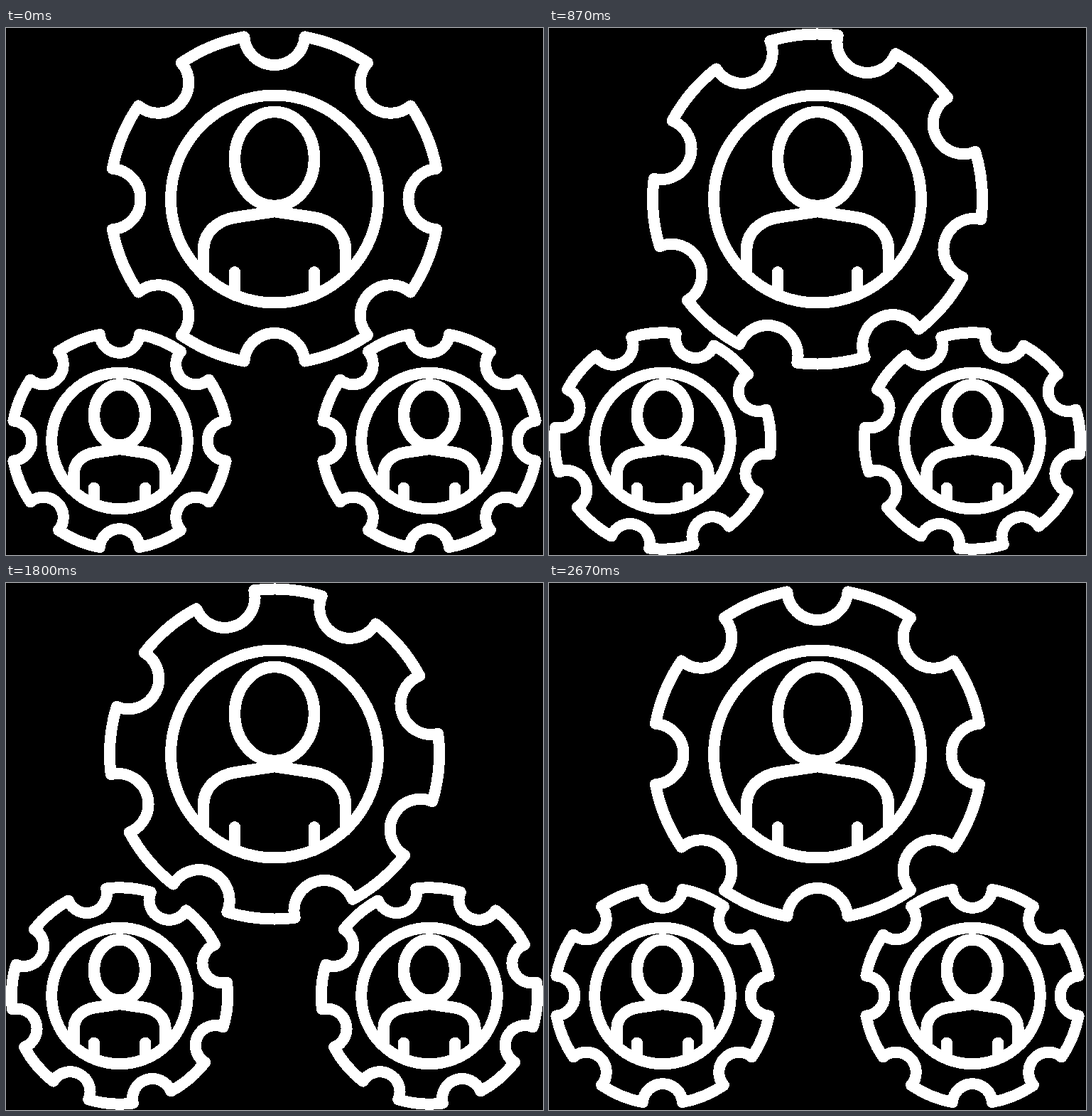
An HTML page that plays this animation: 756x741 px, repeating every 2.7 s.

```html
<!DOCTYPE html>
<html>
<head>
<meta charset="utf-8">
<title>Team gears</title>
<style>
  html, body { margin: 0; height: 100%; overflow: hidden; background: #000; }
  svg { display: block; fill: none; stroke: #fff; stroke-width: 16; stroke-linecap: round; stroke-linejoin: round; shape-rendering: crispEdges; }
  path, circle, ellipse { vector-effect: non-scaling-stroke; }
</style>
</head>
<body>
<svg width="756" height="741" viewBox="0 0 756 741">
  <defs>
    <path id="gear"/>
    <circle id="ring" r="146"/>
    <g id="person" stroke-width="16.6">
      <ellipse cy="-56.5" rx="56" ry="66"/>
      <path d="M-100 107V72C-100 47-80 29-53 25.5L0 17.5L53 25.5C80 29 100 47 100 72V107M-56 103V135M56 103V135"/>
    </g>
  </defs>
</svg>
<script>
const LOOP = 2700, STEP = 30, LAST = LOOP / STEP - 1;
const TEETH = 8, RADIUS = 232, NOTCH_RADIUS = 42.8, NOTCH_HALF = 10.6;

const point = deg => {
  const a = deg * Math.PI / 180;
  return `${RADIUS * Math.sin(a)} ${-RADIUS * Math.cos(a)}`;
};

let outline = `M${point(-NOTCH_HALF)}`;
for (let i = 0; i < TEETH; i++) {
  const mid = i * 360 / TEETH;
  outline += `A${NOTCH_RADIUS} ${NOTCH_RADIUS} 0 0 0 ${point(mid + NOTCH_HALF)}`;
  outline += `A${RADIUS} ${RADIUS} 0 0 1 ${point(mid + 360 / TEETH - NOTCH_HALF)}`;
}
document.getElementById('gear').setAttribute('d', outline + 'Z');

const badge = (x, y, gearScale, personScale) => `
  <g transform="translate(${x} ${y})">
    <g transform="scale(${gearScale})"><use class="spin" href="#gear"/><use href="#ring"/></g>
    <use href="#person" transform="scale(${personScale})"/>
  </g>`;

document.querySelector('svg').insertAdjacentHTML('beforeend',
  badge(378, 240.5, 1, 1) + badge(160, 580.5, 0.656, 0.645) + badge(596, 580.5, 0.656, 0.645));

const gears = document.querySelectorAll('.spin');

// One counterclockwise turn per loop, in even steps.
function draw() {
  const step = Math.floor(performance.now() % LOOP / STEP);
  for (const gear of gears) gear.setAttribute('transform', `rotate(${-360 * step / LAST})`);
  requestAnimationFrame(draw);
}
draw();
</script>
</body>
</html>
```
